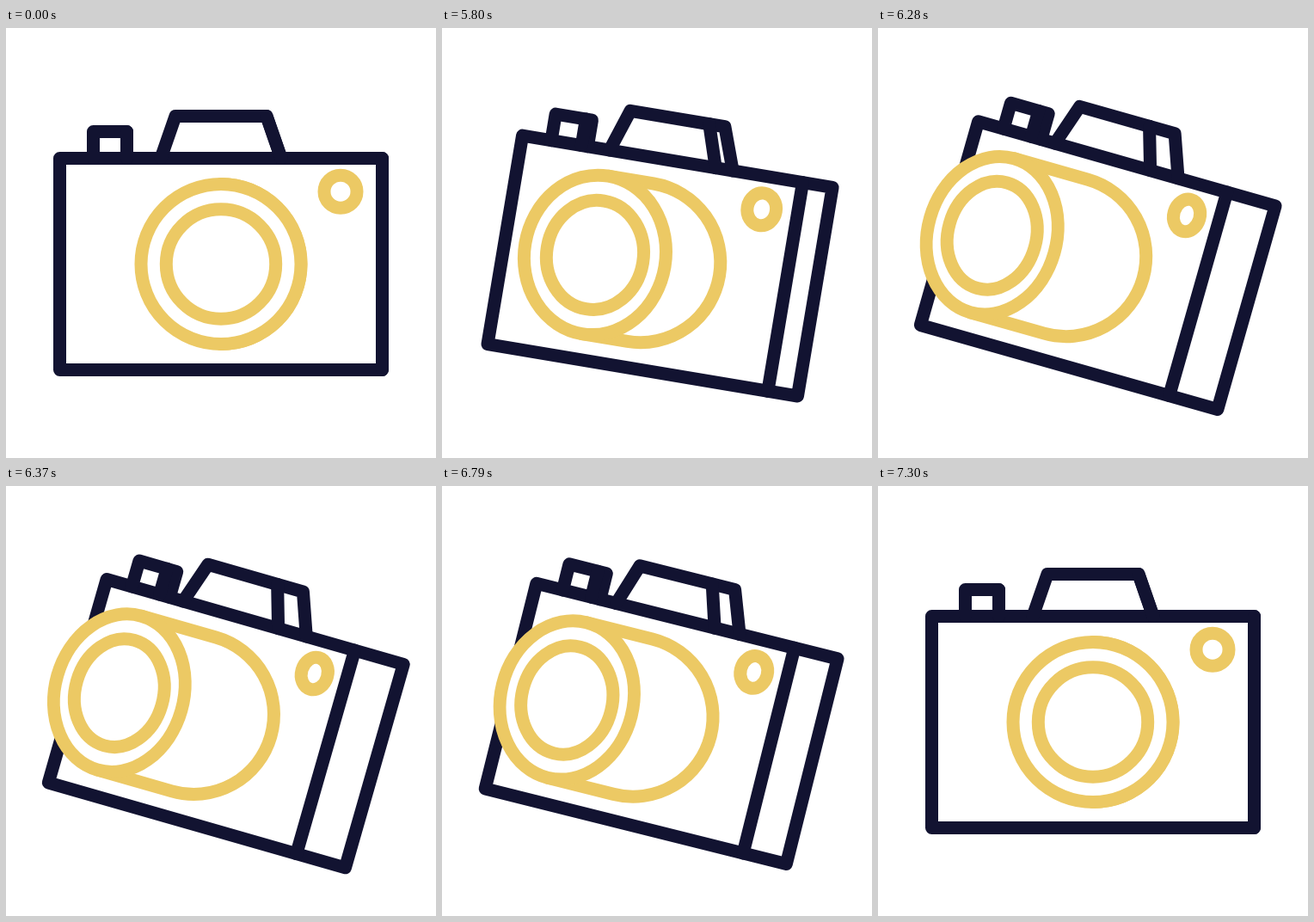
Write an HTML page with a canvas that moves like this. It is 500 px wide and 500 px high and loops after 7330 ms.

```html
<!DOCTYPE html>
<html lang="en">
<head>
<meta charset="utf-8">
<title>Camera</title>
<style>
  html, body { margin: 0; height: 100%; overflow: hidden; background: #fff; }
  canvas { display: block; width: 100vw; height: 100vh; }
</style>
</head>
<body>
<canvas id="stage" width="500" height="500"></canvas>
<script>
const ctx = document.getElementById('stage').getContext('2d');
const LOOP = 7330, START = 5500, STEP = 30, HALF = 30;
const NAVY = '#121331', GOLD = '#ecc964';
const MAX_TILT = 16 * Math.PI / 180;

// Cubic Bezier easing (.3, 0, .14, 1), solved by bisection.
function ease(u) {
  let low = 0, high = 1, s = u;
  for (let i = 0; i < 30; i++) {
    s = (low + high) / 2;
    const r = 1 - s;
    const x = 3 * r * r * s * 0.3 + 3 * r * s * s * 0.14 + s * s * s;
    if (x < u) low = s; else high = s;
  }
  return s * s * (3 - 2 * s);
}

// Tilt progress: 0 facing front, 1 fully turned; the way back mirrors the way out.
function turnAt(time) {
  if (time < START + STEP) return 0;
  const step = Math.floor((time - START) / STEP);
  return ease(Math.max(0, 1 - Math.abs(step - HALF) / HALF));
}

function line(...points) {
  ctx.beginPath();
  for (let i = 0; i < points.length; i += 2) ctx.lineTo(points[i], points[i + 1]);
  ctx.stroke();
}

function ring(x, y, radius, squash) {
  ctx.beginPath();
  ctx.ellipse(x, y, radius * squash, radius, 0, 0, 2 * Math.PI);
  ctx.fill();
  ctx.stroke();
}

// All coordinates are relative to the centre of the camera body.
function draw(p) {
  ctx.setTransform(1, 0, 0, 1, 0, 0);
  ctx.fillStyle = '#fff';
  ctx.fillRect(0, 0, 500, 500);
  ctx.translate(250, 274.5 + 6 * p * (1 - p));
  ctx.rotate(MAX_TILT * p);
  ctx.lineWidth = 15;
  ctx.lineCap = ctx.lineJoin = 'round';

  const top = -123, bottom = 123;
  const left = -187.5 + 14 * p, right = 187.5 - 2 * p, edge = 187.5 - 61 * p;
  ctx.strokeStyle = NAVY;
  line(left, top, right, top, right, bottom, left, bottom, left, top);
  line(edge, top, edge, bottom);

  // Viewfinder
  line(-70 - 11 * p, top, -53 - 12 * p, -172, 53 - 3 * p, -172, 70 - 2 * p, top);
  line(53 - 34 * p, -172, 70 - 36 * p, top);

  // Shutter button
  const buttonLeft = -148.5 + 5.5 * p, buttonRight = -109.5 + 12 * p;
  line(buttonLeft, top, buttonLeft, -154, buttonRight, -154, buttonRight, top);
  line(-109.5, -154, -109.5, top);

  // Lens barrel and front rings
  const squash = 1 - 0.195 * p, front = -123 * p, base = -32.8 * p;
  ctx.strokeStyle = GOLD;
  ctx.beginPath();
  ctx.moveTo(front, -93);
  ctx.arc(base, 0, 93, -Math.PI / 2, Math.PI / 2);
  ctx.lineTo(front, 93);
  ctx.fill();
  ctx.stroke();
  ring(front, 0, 93, squash);
  ring(front, 0, 63.7, squash);
  ring(139 - 50 * p, -84.3, 19, squash);
}

function tick() {
  draw(turnAt(performance.now() % LOOP));
  requestAnimationFrame(tick);
}
tick();
</script>
</body>
</html>
```
